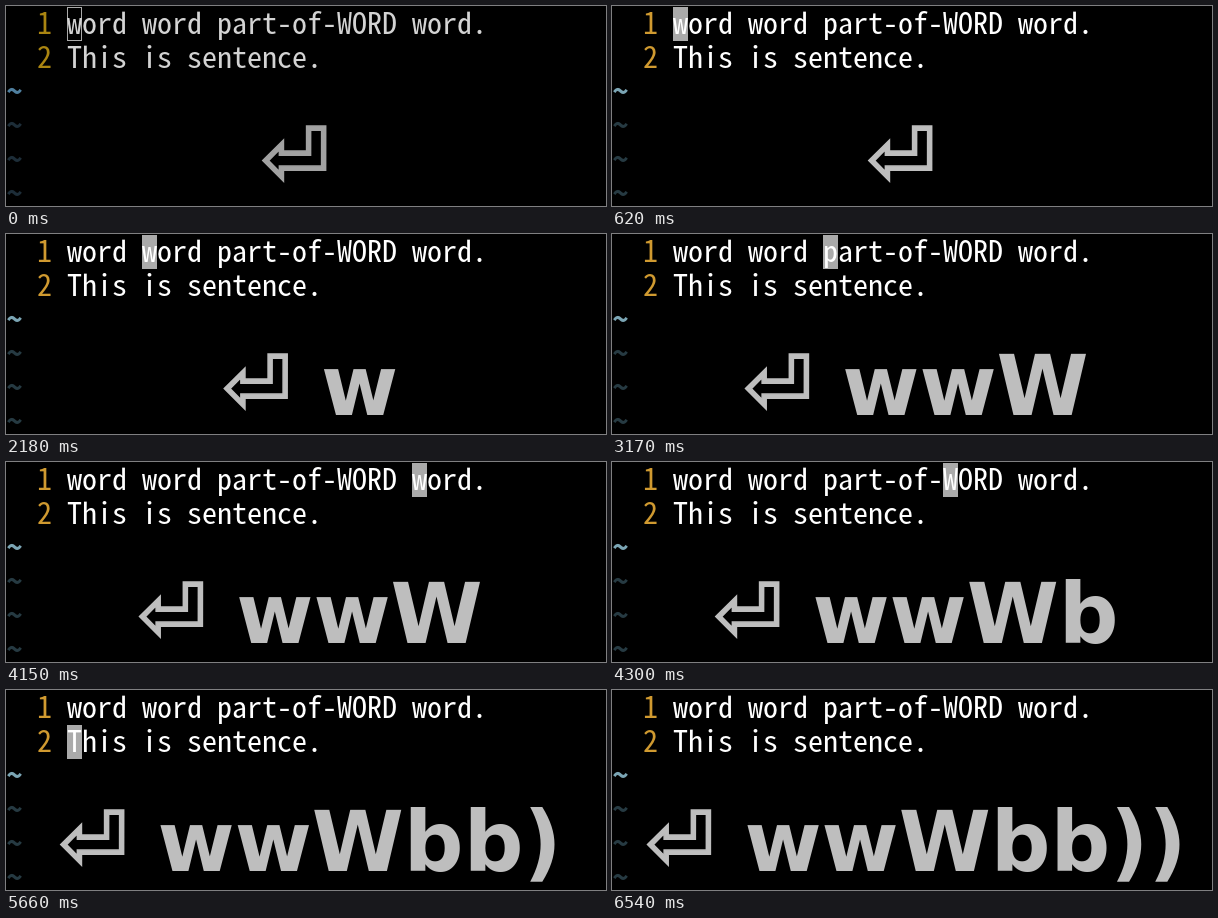
Recreate the animation shown at these times as an HTML page with a canvas. Size 600 by 200 pixels, loop 6.92 s.

```html
<!DOCTYPE html>
<html lang="en">
<head>
<meta charset="utf-8">
<title>Word motions</title>
<style>
html, body { margin: 0; width: 100%; height: 100%; overflow: hidden; background: #000; }
canvas { display: block; }
</style>
</head>
<body>
<canvas id="stage" width="600" height="200"></canvas>
<script>
const ctx = document.getElementById('stage').getContext('2d', { alpha: false });
const LOOP = 6920, CELL = 15, ROW = 34, LEFT = 61, TOP = 1, FOCUS = 620;
const LINES = ['word word part-of-WORD word.', 'This is sentence.'];
const MONO = '30px "Noto Sans Mono CJK JP", "Noto Sans Mono CJK SC", "Noto Sans Mono", monospace';
const KEYS = '83.5px "DejaVu Sans", sans-serif';

// [time, typed keys]
const typed = [[0, ''], [2130, 'w'], [2540, 'ww'], [3170, 'wwW'], [4260, 'wwWb'],
  [4700, 'wwWbb'], [5620, 'wwWbb)'], [6050, 'wwWbb))']];
// [time, row, column]
const moves = [[0, 0, 0], [2180, 0, 5], [2580, 0, 10], [3210, 0, 23], [4300, 0, 18],
  [4740, 0, 17], [5660, 1, 0], [6090, 1, 16]];
// [time, cursor visible]
const blinks = [[0, true], [1090, false], [1580, true], [2090, false], [2180, true],
  [3700, false], [4150, true], [5210, false], [5660, true], [6540, false]];

const at = (track, t) => track.filter(k => k[0] <= t).pop();

function label(text, x, y, color, font) {
  ctx.font = font;
  ctx.fillStyle = color;
  ctx.fillText(text, x, y);
}

function drawCursor(t, focused) {
  if (!at(blinks, t)[1]) return;
  const [, row, col] = at(moves, t);
  const x = LEFT + col * CELL, y = TOP + row * ROW;
  if (focused) {
    ctx.fillStyle = '#aaaaaa';
    ctx.fillRect(x, y, CELL, ROW);
  } else {
    ctx.strokeStyle = '#aaaaaa';
    ctx.lineWidth = 1;
    ctx.strokeRect(x + 0.5, y + 0.5, CELL - 1, ROW - 1);
  }
}

function drawKeys(keys, color) {
  ctx.font = 'bold ' + KEYS;
  const space = ctx.measureText(' ').width, width = ctx.measureText(keys).width;
  const arrow = 70, x = 304 - (arrow + space + width) / 2;
  label(keys, x + arrow + space, 181, color, 'bold ' + KEYS);
  // The arrow has no bold cut, so thicken it with a stroke.
  label('\u23CE', x, 181, color, KEYS);
  ctx.strokeStyle = color;
  ctx.lineWidth = 1.5;
  ctx.strokeText('\u23CE', x, 181);
}

function draw(t) {
  const focused = t >= FOCUS;
  ctx.fillStyle = '#000';
  ctx.fillRect(0, 0, 600, 200);
  drawCursor(t, focused);
  LINES.forEach((line, row) => {
    const y = 28 + row * ROW;
    label(row + 1, LEFT - 2 * CELL, y, focused ? '#d09a30' : '#aa8511', MONO);
    label(line, LEFT, y, focused ? '#ffffff' : '#d3d3d3', MONO);
  });
  for (let row = 2; row < 6; row++) {
    const bright = focused ? '#7ba5b4' : '#4f7f9f', dim = focused ? '#263a42' : '#1d2d38';
    label('~', 1, 28 + row * ROW, row === 2 ? bright : dim, 'bold ' + MONO);
  }
  drawKeys(at(typed, t)[1], focused ? '#bebebe' : '#a2a2a2');
}

function tick(now) {
  draw(now % LOOP);
  requestAnimationFrame(tick);
}
draw(0);
requestAnimationFrame(tick);
</script>
</body>
</html>
```
